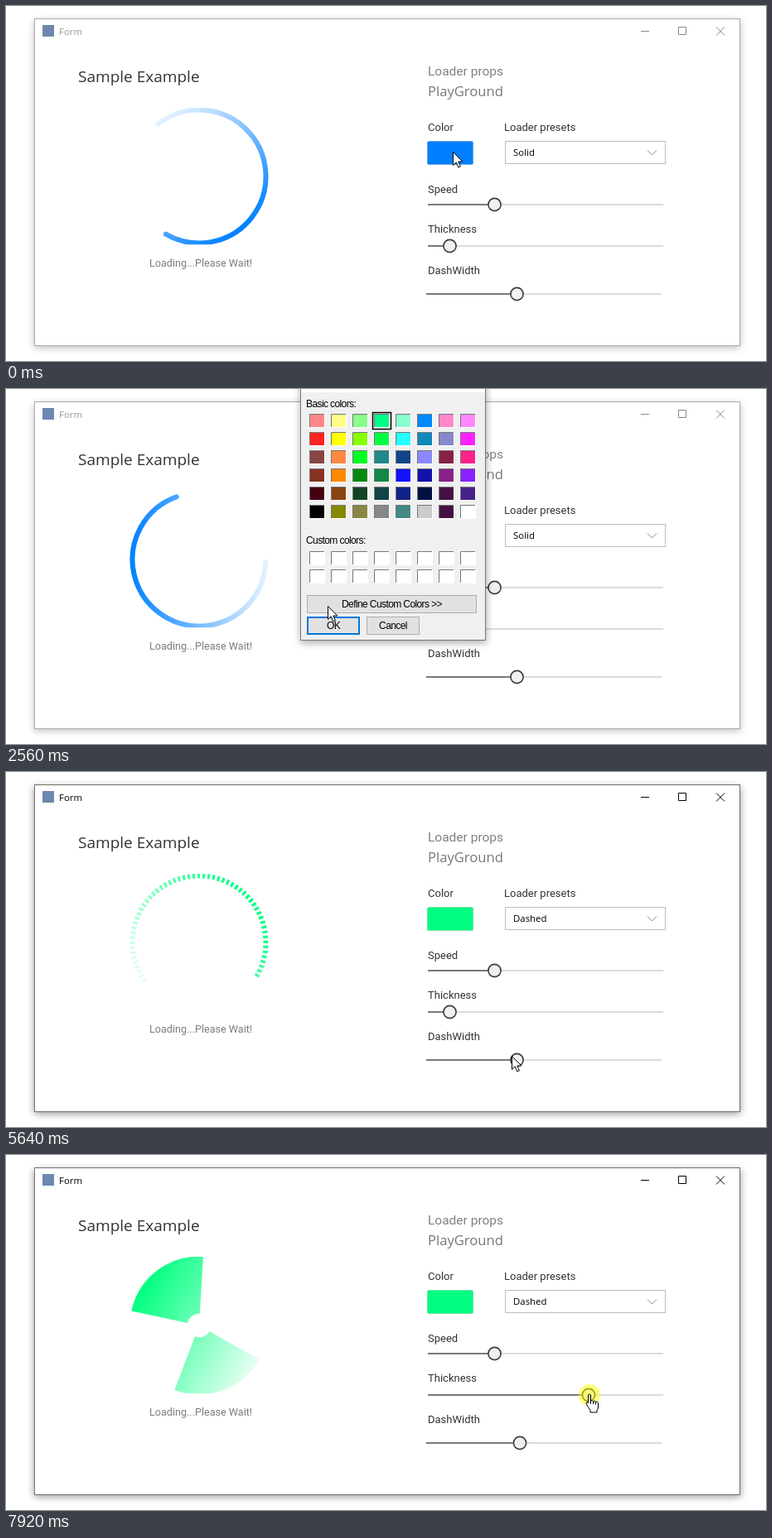
Animation of 917 by 429 pixels, one loop 8 s. Source, as an HTML page:

```html
<!DOCTYPE html>
<html lang="en">
<head>
<meta charset="utf-8">
<title>Loader playground</title>
<style>
html, body { margin: 0; width: 100%; height: 100%; overflow: hidden; background: #fff; }
svg { display: block; width: 100vw; height: 100vh; }
text { white-space: pre; }
.ui { font: 11.4px "Open Sans", "Noto Sans", sans-serif; }
.label { font: 13px Roboto, sans-serif; fill: #333; }
.hand { font-family: "Open Sans", sans-serif; }
.dlg { font: 12px "Liberation Sans", Arial, sans-serif; letter-spacing: -.6px; }
</style>
</head>
<body>
<svg viewBox="0 0 917 429" preserveAspectRatio="none">
  <defs>
    <filter id="blur" x="-20%" y="-20%" width="140%" height="140%"><feGaussianBlur stdDeviation="5"/></filter>
    <clipPath id="box"><rect x="148.5" y="123" width="169" height="165.3"/></clipPath>
    <linearGradient id="fade" gradientUnits="userSpaceOnUse">
      <stop offset="0" stop-opacity=".1"/><stop offset="1"/>
    </linearGradient>
  </defs>
  <rect width="917" height="429" fill="#fff"/>
  <rect id="shade" x="34" y="18" width="852" height="395" filter="url(#blur)"/>
  <rect id="frame" x="34.5" y="15.5" width="851" height="395" fill="#fff"/>
  <rect x="44" y="23" width="14" height="14" fill="#6d87b0"/>
  <g id="caption">
    <text class="ui" x="64" y="35">Form</text>
    <path id="buttons" d="M766 30.5h10M811.5 25.5h9v9h-9zM857 25.500l10 10m0-10l-10 10" fill="none"/>
  </g>
  <text class="hand" x="87" y="92" font-size="19" fill="#333">Sample Example</text>
  <path id="arc" fill="none" stroke="url(#fade)" clip-path="url(#box)"/>
  <text class="label" x="173" y="315" style="font-size:12.6px;fill:#7d7d7d">Loading...Please Wait!</text>
  <text class="label" x="509" y="84" style="font-size:15.5px;fill:#808080">Loader props</text>
  <text class="hand" x="509" y="109" font-size="16.6" fill="#777">PlayGround</text>
  <text class="label" x="509" y="151">Color</text>
  <text class="label" x="601" y="151">Loader presets</text>
  <text class="label" x="509" y="226">Speed</text>
  <text class="label" x="509" y="274">Thickness</text>
  <text class="label" x="509" y="324">DashWidth</text>
  <rect id="swatch" x="508.500" y="163.500" width="55" height="28" rx="1.500" stroke="#000" stroke-opacity=".12"/>
  <rect x="602.500" y="163.500" width="193" height="27" fill="#fff" stroke="#bdbdbd"/>
  <text id="preset" class="ui" x="612" y="181"></text>
  <path d="M774 174.500l5.500 5.500 5.500-5.500" fill="none" stroke="#888"/>
  <g id="sliders"></g>
  <g id="menu">
    <path d="M606 194h192.500v89H606z" fill="#555" opacity=".75"/>
    <rect x="602.500" y="191.500" width="193" height="89" fill="#fff" stroke="#0078d7"/>
    <rect id="hover" x="603" width="192" height="22" fill="#1e90ff"/>
  </g>
  <g id="dialog">
    <rect x="355" y="-20" width="225" height="327" opacity=".32" filter="url(#blur)"/>
    <rect x="355.500" y="-5.500" width="223" height="309" fill="#f0f0f0" stroke="#777"/>
    <rect x="356" y="0" width="222" height="4" fill="#fff"/>
    <g class="dlg">
      <text x="362" y="22">Basic colors:</text>
      <text x="362" y="187">Custom colors:</text>
    </g>
    <g id="cells"></g>
    <rect id="picked" y="28.500" width="22" height="20" fill="none" stroke="#000" stroke-width="1.500"/>
  </g>
  <circle id="glow" r="13" fill="#ff0" fill-opacity=".5"/>
  <g id="arrow"><path d="M.5.500v16l3.700-3.500 2.600 6 2.600-1.100-2.600-5.900h5z" fill="#fff" stroke="#000"/></g>
  <g id="finger"><path d="M-1.500 1q1.500-2 3 0v7q2-1 3 .6 2-1 3 .6 3-.6 3 1.800v5q0 2-1.500 3.500v2.500h-8v-2.500q-3.500-4.500-5-8.500-.2-2 2.500-.5zM1.500 8v4M4.500 9v3M7.500 9.500v3" fill="#fff" stroke="#000"/></g>
</svg>
<script>
const NS = "http://www.w3.org/2000/svg", LOOP = 8000;
const $ = id => document.getElementById(id);

function set(node, attrs) {
  for (const k in attrs) node.setAttribute(k, attrs[k]);
  return node;
}
function add(parent, tag, attrs, text) {
  const node = set(document.createElementNS(NS, tag), attrs);
  if (text) node.textContent = text;
  return parent.appendChild(node);
}
const show = (id, on) => set($(id), { visibility: on ? "visible" : "hidden" });
const between = (t, a, b) => t >= a && t < b;

// Linear interpolation over keys [time, value, ...]
function track(keys, t) {
  let i = 1;
  while (i < keys.length - 1 && t >= keys[i][0]) i++;
  const a = keys[i - 1], b = keys[i];
  const p = Math.min(1, Math.max(0, (t - a[0]) / (b[0] - a[0])));
  return a.slice(1).map((v, n) => v + (b[n + 1] - v) * p);
}

const OPEN = 160, PICK = 2160, CLOSE = 2800, DROP = 4340, CHOOSE = 5300, DASH = 5840, GRAB = 6460;
const pointer = [
  [0, 539, 176], [400, 539, 176], [840, 517, 150], [960, 517, 148], [1640, 438, 36],
  [2000, 455, 37], [2240, 455, 37], [2560, 388, 262], [2720, 385, 290], [3200, 385, 291],
  [3480, 386, 286], [4200, 674, 180], [4400, 674, 181], [4680, 663, 206], [4900, 655, 224],
  [5300, 650, 227], [5640, 610, 343], [5720, 616, 350], [6000, 620, 350],
  [6060, 618, 329], [6420, 537, 290], [6500, 537, 290], [6880, 618, 289],
  [7160, 674, 289], [7680, 704, 289]
];
const thumb = [[6500, 535.5], [6880, 615], [7160, 668.5], [7680, 703]];
const spin = [[0, 232], [1640, 996], [3200, 1752.5], [4680, 2411.8], [CHOOSE, 2691]];
const spinDashed = [[CHOOSE, -8.5], [5640, 144.5], [7160, 812], [7920, 1109.5], [8000, 1145]];

function slider(x, y) {
  const g = $("sliders");
  add(g, "path", { d: `M${x} ${y}h284`, stroke: "#dcdcdc", "stroke-width": 2 });
  const bar = add(g, "path", { stroke: "#7c777c", "stroke-width": 2 });
  const knob = add(g, "circle", { cy: y, r: 7.6, fill: "#f0f0f0", stroke: "#3c3c3c", "stroke-width": 1.6 });
  return pos => {
    set(bar, { d: `M${x} ${y}H${pos}` });
    set(knob, { cx: pos });
  };
}
const speed = slider(509, 240), thickness = slider(509, 290), dashWidth = slider(507, 348);
speed(589.5);

const presets = ["Solid", "Dashed", "Dotted", "Diamond"];
const items = presets.map((name, i) => add($("menu"), "text", { class: "ui", x: 610, y: 208 + 22 * i }, name));

function cell(i, fill, top) {
  const x = 366 + 26 * (i % 8), y = top + 22 * Math.floor(i / 8);
  const g = $("cells");
  add(g, "rect", { x, y, width: 18, height: 16, fill });
  add(g, "path", { d: `M${x + .5} ${y + 16}v-15.500h17.500`, fill: "none", stroke: "#777" });
  add(g, "path", { d: `M${x} ${y + 16.5}h18.500v-16.500`, fill: "none", stroke: "#fff" });
}
`f88 ff8 8f8 0f8 8fc 08f f8c f8f
 f22 ff0 8f0 0f4 2ff 18b 88c f2f
 844 f84 0f2 288 148 88f 824 f28
 832 f80 081 184 11f 11a 828 82f
 401 841 142 144 128 014 414 428
 000 880 884 888 488 ccc 414 fff`.split(/\s+/).forEach((c, i) => cell(i, "#" + c, 30));
for (let i = 0; i < 16; i++) cell(i, "#fff", 196);

function button(x, y, w, label, main) {
  const d = $("dialog");
  add(d, "rect", {
    x: x + (main ? 1 : .5), y: y + (main ? 1 : .5), width: w - (main ? 2 : 1), height: main ? 20 : 21,
    fill: "#e1e1e1", stroke: main ? "#0078d7" : "#adadad", "stroke-width": main ? 2 : 1
  });
  add(d, "text", { class: "dlg", x: x + w / 2, y: y + 15, "text-anchor": "middle" }, label);
}
button(363, 249, 205, "Define Custom Colors >>");
button(363, 275, 64, "OK", true);
button(435, 275, 64, "Cancel");

function drawLoader(t, color, width) {
  const cx = 233, cy = 206, outer = 83.5, span = 248;
  const dashed = t >= CHOOSE;
  const [tail] = track(dashed ? spinDashed : spin, t);
  const r = outer - width / 2;
  const at = (deg, rad) => {
    const a = deg * Math.PI / 180;
    return [cx + rad * Math.cos(a), cy + rad * Math.sin(a)];
  };
  const [x1, y1] = at(tail, outer), [x2, y2] = at(tail + 180, outer);
  set($("fade"), { x1, y1, x2, y2 });
  for (const stop of $("fade").children) set(stop, { "stop-color": color });
  const dash = !dashed ? "none" : t < DASH ? "3.2 2.8" : `${width} ${width}`;
  set($("arc"), {
    d: `M${at(tail, r)}A${r} ${r} 0 1 1 ${at(tail + span, r)}`,
    "stroke-width": width, "stroke-dasharray": dash,
    "stroke-linecap": dashed ? "butt" : "round"
  });
}

function drawPointer(t) {
  const [x, y] = track(pointer, t);
  const dragging = between(t, 5720, 6020) || t >= GRAB;
  const pressed = dragging || between(t, 2080, 2240) || between(t, 2720, 2840) || between(t, 4220, 4340);
  show("glow", pressed);
  show("finger", dragging);
  show("arrow", !dragging);
  set($("glow"), { cx: x, cy: dragging ? y + 1 : y });
  for (const id of ["arrow", "finger"]) set($(id), { transform: `translate(${x} ${y})` });
}

function draw(t) {
  const active = t >= CLOSE, color = active ? "#00ff80" : "#0080ff";
  set($("shade"), { opacity: active ? .42 : .26 });
  set($("frame"), { stroke: active ? "#707070" : "#aaa" });
  set($("caption"), { fill: active ? "#000" : "#999" });
  set($("buttons"), { stroke: active ? "#000" : "#888" });
  set($("swatch"), { fill: color });

  show("dialog", between(t, OPEN, CLOSE));
  set($("picked"), { x: t < PICK ? 494.5 : 442.5 });

  show("menu", between(t, DROP, CHOOSE));
  const over = t < 4840 ? 0 : 1;
  set($("hover"), { y: 192 + 22 * over });
  items.forEach((item, i) => set(item, { fill: i === over ? "#fff" : "#000" }));
  $("preset").textContent = presets[t < CHOOSE ? 0 : 1];

  const [pos] = track(thumb, t);
  thickness(pos);
  dashWidth(track([[5740, 616.5], [5960, 620]], t)[0]);
  drawLoader(t, color, (pos - 519.5) / 2.65);
  drawPointer(t);
}

const start = performance.now();
function tick() {
  const t = (performance.now() - start) % LOOP;
  draw(Math.floor(t / 40) * 40);
  requestAnimationFrame(tick);
}
draw(0);
requestAnimationFrame(tick);
</script>
</body>
</html>
```
